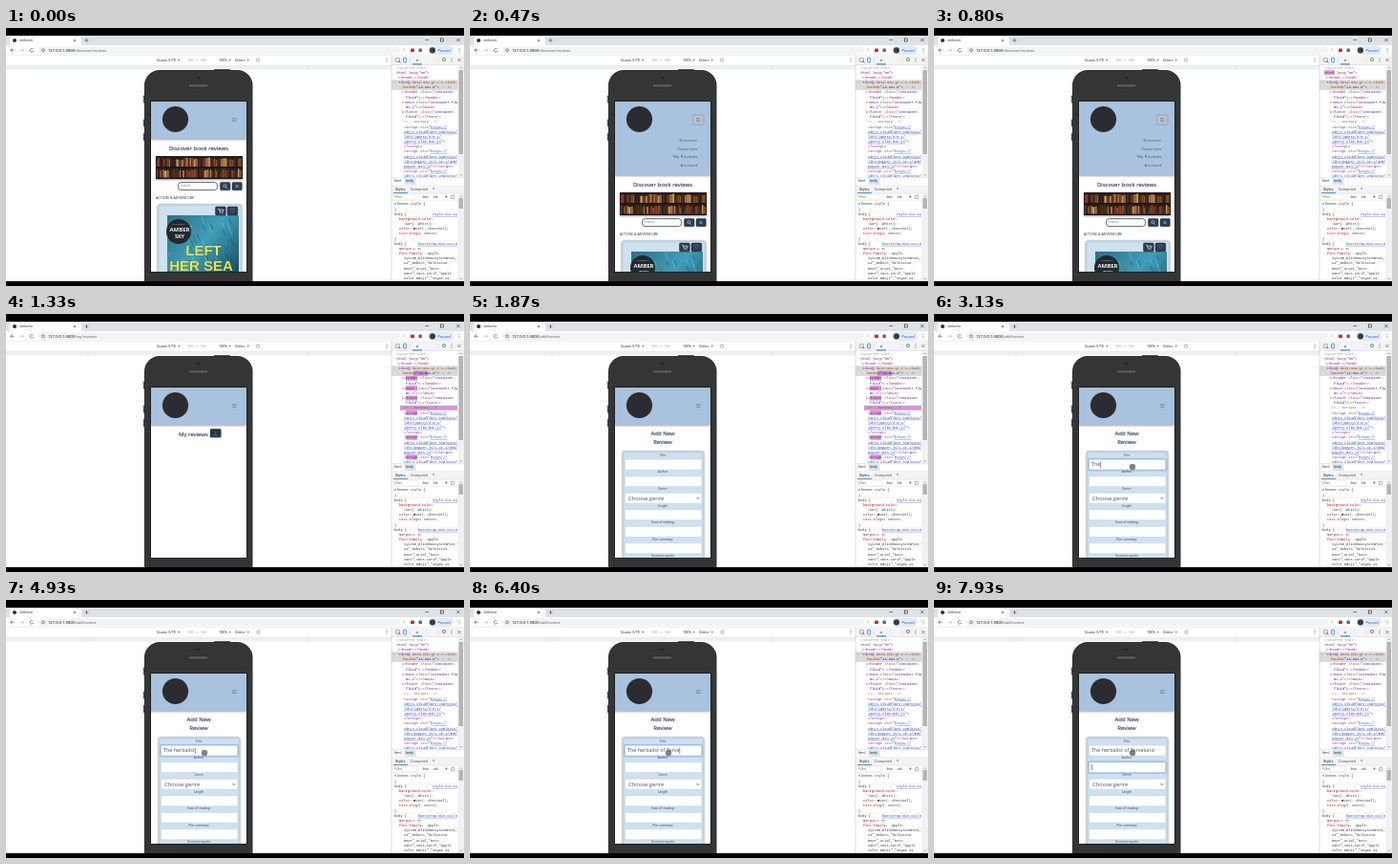
An HTML page with a canvas that plays this animation: 480 px wide and 270 px high, repeating every 8000 ms.

```html
<!DOCTYPE html>
<html lang="en">
<head>
<meta charset="utf-8">
<title>Book review app demo</title>
<style>
html, body { margin: 0; width: 100%; height: 100%; overflow: hidden; background: #000; }
canvas { display: block; width: 480px; height: 270px; }
</style>
</head>
<body>
<canvas id="stage"></canvas>
<script>
const LOOP = 8000;
const SANS = '"Open Sans", "Noto Sans", sans-serif';
const UI = 'Roboto, Arial, sans-serif';
const MONO = '"Liberation Mono", "DejaVu Sans Mono", monospace';
const NAVY = '#222b48', PALE = '#cfe1ee', HEAD = '#a9c2de', GREY = '#5f6368';

const canvas = document.getElementById('stage');
const ctx = canvas.getContext('2d');
const dpr = window.devicePixelRatio || 1;
canvas.width = 480 * dpr;
canvas.height = 270 * dpr;

function rect(x, y, w, h, fill) {
  ctx.fillStyle = fill;
  ctx.fillRect(x, y, w, h);
}
function round(x, y, w, h, r, fill, stroke, lw = 0.6) {
  ctx.beginPath();
  ctx.roundRect(x, y, w, h, r);
  if (fill) { ctx.fillStyle = fill; ctx.fill(); }
  if (stroke) { ctx.strokeStyle = stroke; ctx.lineWidth = lw; ctx.stroke(); }
}
function disc(x, y, r, fill) {
  ctx.beginPath();
  ctx.arc(x, y, r, 0, 7);
  ctx.fillStyle = fill;
  ctx.fill();
}
function line(color, lw, ...p) {
  ctx.beginPath();
  for (let i = 0; i < p.length; i += 2) ctx.lineTo(p[i], p[i + 1]);
  ctx.strokeStyle = color;
  ctx.lineWidth = lw;
  ctx.stroke();
}
function text(s, x, y, size, color, font = UI, align = 'left', weight = 400) {
  ctx.font = `${weight} ${size}px ${font}`;
  ctx.textAlign = align;
  ctx.textBaseline = 'middle';
  ctx.fillStyle = color;
  ctx.fillText(s, x, y);
}
function shadow(color, blur, dy) {
  ctx.shadowColor = color;
  ctx.shadowBlur = blur * dpr;
  ctx.shadowOffsetY = dy * dpr;
}
function noShadow() { shadow('transparent', 0, 0); }
function clipped(x, y, w, h, draw) {
  ctx.save();
  ctx.beginPath();
  ctx.rect(x, y, w, h);
  ctx.clip();
  draw();
  ctx.restore();
}
function randomizer(seed) {
  return () => (seed = (seed * 16807) % 2147483647) / 2147483647;
}
const clamp = v => Math.max(0, Math.min(1, v));
const ease = v => { v = clamp(v); return v * v * (3 - 2 * v); };

// ---- timeline ----
const OPEN = 70, REVIEWS = 930, ADD = 1800, FOCUS = 2470, TAB = 7670;
const TITLE = 'The herbalist of Torvelund';
const KEYS = [2670, 2870, 3070, 3270, 3400, 3470, 3530, 3600, 3730, 3930, 4670, 4800, 4870,
  5000, 5070, 5130, 5200, 5400, 5600, 5800, 6000, 6400, 6600, 6870, 7070, 7270];

// ---- browser window ----
function caret(x, y) {
  ctx.beginPath();
  ctx.moveTo(x, y); ctx.lineTo(x + 2.4, y); ctx.lineTo(x + 1.2, y + 1.6);
  ctx.fillStyle = GREY;
  ctx.fill();
}
function cross(x, y, r, color = '#444') {
  line(color, 0.6, x - r, y - r, x + r, y + r);
  line(color, 0.6, x + r, y - r, x - r, y + r);
}
function dots(x, y) {
  for (let i = -1; i < 2; i++) disc(x, y + i * 1.7, 0.5, GREY);
}
function drawBrowser(path) {
  rect(0, 0, 480, 270, '#000');
  rect(0, 8, 480, 257, '#fff');
  rect(0, 8, 480, 10, '#dee1e6');
  round(4, 9, 75, 10, [3, 3, 0, 0], '#fff');
  disc(9, 13, 2, '#2c2d33');
  text('Jotloven', 14, 13, 3.7, '#333');
  cross(72, 13, 1.1);
  line('#444', 0.6, 82.5, 13, 86.5, 13);
  line('#444', 0.6, 84.5, 11, 84.5, 15);
  line('#222', 0.6, 439.5, 12.5, 443, 12.5);
  ctx.strokeRect(455.5, 11, 3, 3);
  cross(474, 12.5, 1.6, '#222');

  line('#555', 0.7, 8.5, 23.3, 4.8, 23.3);
  line('#555', 0.7, 6.5, 21.5, 4.7, 23.3, 6.5, 25.1);
  line('#bbb', 0.7, 14.5, 23.3, 18.5, 23.3);
  line('#bbb', 0.7, 16.8, 21.5, 18.6, 23.3, 16.8, 25.1);
  ctx.beginPath();
  ctx.arc(27, 23.3, 1.8, 0.4, 5.6);
  ctx.strokeStyle = '#555';
  ctx.stroke();
  round(34, 19.5, 379, 7.6, 3.8, '#f1f3f4');
  ctx.beginPath();
  ctx.arc(39, 23.3, 1.5, 0, 7);
  ctx.stroke();
  const host = '127.0.0.1:5000';
  text(host, 44, 23.4, 4.2, '#202124');
  text(path, 44 + ctx.measureText(host).width, 23.4, 4.2, '#666a6e');
  text('☆', 417, 23.3, 4.5, GREY, '"DejaVu Sans", sans-serif', 'center');
  round(424, 21.4, 4, 3.6, 0.6, '#b33a45');
  round(432.5, 21.4, 3.4, 3.6, 0.6, '#666');
  round(442.5, 19.3, 26, 8, 4, '#e3edfb', '#b8cdf0', 0.4);
  disc(447, 23.3, 3.1, '#3d3a3b');
  text('Paused', 452.5, 23.4, 4, '#2565c7');
  dots(475, 23.3);

  // device toolbar and ruler
  rect(0, 28, 404, 11, '#fff');
  line('#d5d7da', 0.5, 0, 28.2, 480, 28.2);
  text('Quorin 5/TE', 158, 33.7, 3.8, '#333');
  caret(180, 33);
  text('320   ×   568', 190, 33.7, 3.7, '#aaa');
  text('100%', 223, 33.7, 3.7, '#333');
  caret(233.5, 33);
  text('Online', 240, 33.7, 3.7, '#333');
  caret(252.5, 33);
  round(262.7, 32, 3, 3, 0.4, null, '#777', 0.5);
  dots(399, 33.5);
  rect(0, 39, 404, 4.5, '#eeeff0');
  line('#dcdddf', 0.4, 0, 39, 404, 39);
  line('#c5c7c9', 0.5, 86, 40, 86, 43);
  line('#c5c7c9', 0.5, 317, 40, 317, 43);
}

// ---- developer tools ----
const INK = { p: '#881280', a: '#994500', v: '#1a1aa6', k: '#333', g: '#999', c: '#3b7a3f', r: '#c80000', u: '#2a3cc0' };
const STEP = 5.17;

// "^x" switches to ink x
function code(s, x, y) {
  for (const part of s.split('^').slice(1)) {
    const word = part.slice(1);
    text(word, x, y, 3.6, INK[part[0]], MONO);
    const w = ctx.measureText(word).width;
    if (part[0] === 'u') line(INK.u, 0.35, x, y + 1.9, x + w, y + 1.9);
    x += w;
  }
}
const SRC = '^p<script ^asrc^k="^uhttps://';
const CDN = '^ucdnjs.cloudflare.com/ajax/';
const TREE = [
  [409, '^g<\!DOCTYPE html>'],
  [409, '^p<html ^alang^p="^ven^p">'],
  [411, '^k▸^p<head>^k…^p<\/head>'],
  [411, '^k▾^p<body ^adata-new-gr-c-s-check-'],
  [415, '^aloaded^p="^v14.981.0^p">^g == $0'],
  [415, '^k▸^p<header ^aclass^p="^vcontainer-'],
  [419, '^vfluid^p">^k…^p<\/header>'],
  [415, '^k▸^p<main ^aclass^p="^vcontainer-fluid'],
  [419, '^vmt-2^p">^k…^p<\/main>'],
  [415, '^k▸^p<footer ^aclass^p="^vcontainer-'],
  [419, '^vfluid^p">^k…^p<\/footer>'],
  [417, '^c<\!-- Scripts --\>'],
  [417, SRC], [417, CDN], [417, '^ulibs/jquery/3.5.1/'], [417, '^ujquery.slim.min.js^p">'], [417, '^p<\/script>'],
  [417, SRC], [417, CDN], [417, '^ulibs/popper.js/1.16.1/umd/'], [417, '^upopper.min.js^p"><\/script>'],
  [417, SRC], [417, CDN]
];
const RULES = [
  [407, '^kelement.style {'], [407, '^k}'], [407, '^kbody {'],
  [412, '^rbackground-color^k:'], [417, '^k□var(--white);'],
  [412, '^rcolor^k: ■var(--charcoal);'], [412, '^rtext-align^k: center;'], [407, '^k}'],
  [407, '^kbody {'], [412, '^rmargin^k:▸ 0;'], [412, '^rfont-family^k: -apple-'],
  [417, '^ksystem,BlinkMacSystemFont,"S'], [417, '^kUI",Roboto,"Helvetica'],
  [417, '^kNeue",Arial,"Noto'], [417, '^kSans",sans-serif,"Apple'], [417, '^kColor Emoji","Segoe UI']
];
function flash(row, x, w, alpha) {
  rect(x, 38.9 + row * STEP, w, 5, `rgba(190,95,185,${alpha})`);
}
function scrollbar(y, h, top, size) {
  rect(473.5, y, 6.5, h, '#f1f1f1');
  rect(474.5, top, 4.5, size, '#b5b5b5');
  line('#777', 0.6, 475.6, y + 3.4, 476.8, y + 2.2, 478, y + 3.4);
  line('#777', 0.6, 475.6, y + h - 3.4, 476.8, y + h - 2.2, 478, y + h - 3.4);
}
function drawTools(t) {
  rect(404, 28.4, 76, 237, '#fff');
  rect(404, 28.4, 76, 10, '#f3f3f3');
  line('#c8cacc', 0.5, 404, 38.4, 480, 38.4);
  round(408.5, 31.5, 4, 4, 0.6, null, '#666', 0.5);
  line('#444', 0.7, 413.6, 36.4, 411, 33.8);
  round(416.5, 31.2, 3, 4.8, 0.5, null, '#1a73e8', 0.7);
  line('#ccc', 0.5, 423.5, 31, 423.5, 36.5);
  text('»', 431, 33.2, 6, '#444', UI, 'center');
  rect(426, 37.4, 10, 1, '#1a73e8');
  line('#ccc', 0.5, 453, 31, 453, 36.5);
  text('⚙', 459, 33.5, 5.5, '#555', '"DejaVu Sans", sans-serif', 'center');
  dots(467, 33.5);
  cross(475, 33.5, 1.4);

  clipped(404, 38.6, 70, 118, () => {
    rect(404, 54.2, 70, 10.7, '#dadada');
    text('…', 405, 56.3, 4, '#555');
    if (t > 600 && t < REVIEWS) flash(1, 409, 11, 0.55);
    if (t >= REVIEWS && t < 2600) {
      const a = 0.65 * (1 - clamp((t - 2000) / 530));
      flash(4, 427, 15, a);
      for (const row of [5, 7, 9, 12, 17, 21]) flash(row, 419, 12, a);
      flash(11, 413, 60, a);
    }
    TREE.forEach(([x, s], i) => code(s, x, 41.6 + i * STEP));
  });
  scrollbar(38.6, 118, 44, 88);

  rect(404, 156.6, 76, 7.4, '#fff');
  line('#d0d0d0', 0.5, 404, 156.7, 480, 156.7);
  rect(417.5, 157.1, 12, 6.8, '#dbe4f0');
  text('html', 407, 160.4, 3.7, '#333');
  text('body', 419, 160.4, 3.7, '#333');
  rect(404, 164, 76, 9, '#f3f3f3');
  text('Styles', 408, 168.5, 3.9, '#222');
  text('Computed', 424, 168.5, 3.9, '#555');
  text('»', 447, 168, 5, '#555');
  rect(406, 172.2, 15, 0.9, '#1a73e8');
  line('#d0d0d0', 0.4, 404, 173.2, 480, 173.2);
  round(405, 174.3, 28, 5.4, 0.5, '#fff', '#ddd', 0.4);
  text('Filter', 407, 177, 3.7, '#777');
  text(':hov', 436, 177, 3.7, '#333');
  text('.cls', 447, 177, 3.7, '#333');
  text('+', 460, 176.7, 5, '#333');
  round(466.5, 175.3, 3.4, 3.4, 0.5, null, '#666', 0.5);
  line('#d8d8d8', 0.4, 404, 180.7, 480, 180.7);
  clipped(404, 181, 70, 84, () => {
    RULES.forEach(([x, s], i) => code(s, x, 184.4 + i * STEP));
    for (const row of [2, 8]) line('#ddd', 0.4, 404, 181.8 + row * STEP, 474, 181.8 + row * STEP);
    code('^ustyle.css:24', 447, 195.4);
    code('^ubootstrap.min.css:8', 432, 226.2);
  });
  scrollbar(173.5, 91.5, 178, 11);
  line('#c6c8ca', 0.6, 404, 28.4, 404, 265);
}

// ---- phone ----
function drawPhone() {
  round(143.8, 70.5, 2, 8, 0.7, '#555');
  round(143.8, 95.5, 2, 8, 0.7, '#555');
  round(143.8, 110, 2, 8, 0.7, '#555');
  round(218, 42.9, 17, 2, 0.7, '#555');
  round(145, 44, 113.5, 250, 16, '#252627');
  round(146.4, 45.4, 110.7, 248, 14.6, '#343536', '#47494a', 0.6);
  disc(201.5, 52, 1.3, '#1d1e20');
  round(191, 58.6, 21, 3.4, 1.7, '#59595b', '#222', 0.6);
  rect(151.3, 76.3, 101.4, 179.4, '#1c1c1d');
  rect(152, 77, 100, 178, '#fff');
}
function heading(s, y) {
  shadow('rgba(70,80,130,.55)', 1.2, 0.5);
  text(s, 202, y, 6, NAVY, SANS, 'center');
  noShadow();
}
function drawHeader(drop) {
  shadow('rgba(90,80,110,.55)', 2, 0.8);
  rect(152, 77, 100, 39 + drop, HEAD);
  noShadow();
  disc(177.5, 95.5, 13.6, '#2b2c31');
  if (drop > 0) {
    round(233.5, 91, 11.5, 10, 1.4, '#b9c3cf', '#8a95a5', 0.7);
    clipped(152, 77, 100, 39 + drop, () => {
      ctx.letterSpacing = '0.45px';
      ['Discover', 'Favorites', 'My Reviews', 'Account'].forEach((s, i) =>
        text(s, 238.6, 118 + i * 8.7, 3.9, '#38465f', SANS, 'right'));
      ctx.letterSpacing = '0px';
    });
  }
  for (let i = -1; i < 2; i++) line('#6d7f98', 0.6, 237, 96 + i * 1.5, 241.5, 96 + i * 1.5);
}
function drawShelves(x, y) {
  const rnd = randomizer(41);
  const tones = ['#7b4a27', '#a8713d', '#4a2c1c', '#c79a62', '#5d3a2a', '#32241f', '#8c3b28'];
  shadow('rgba(60,50,90,.5)', 2, 0.8);
  rect(x, y, 91, 24, '#2a1b16');
  noShadow();
  for (let row = 0; row < 2; row++) {
    for (let bx = 1; bx < 89;) {
      const w = 1 + rnd() * 1.7, h = 7 + rnd() * 2.5;
      rect(x + bx, y + 11 + row * 11.7 - h, w - 0.3, h, tones[Math.floor(rnd() * tones.length)]);
      bx += w;
    }
    rect(x, y + 11 + row * 11.7, 91, 1.2, '#1d1312');
  }
  rect(x + 44, y, 1.4, 24, '#20140f');
}
function drawCover(y) {
  const g = ctx.createLinearGradient(169, y, 244, y + 60);
  g.addColorStop(0, '#2f6f86');
  g.addColorStop(0.5, '#3f9fb8');
  g.addColorStop(1, '#174d68');
  rect(169, y, 75, 75, g);
  const rnd = randomizer(7);
  for (let i = 0; i < 46; i++) {
    const x = 170 + rnd() * 70, by = y + rnd() * 62, l = 3 + rnd() * 7;
    line(i % 2 ? 'rgba(170,225,232,.4)' : 'rgba(10,50,75,.45)', 0.8, x, by, x + l * 0.4, by + l);
  }
  disc(181, y + 17, 13, '#22292f');
  text('AUTHOR OF', 181, y + 9, 2.4, '#cdd6d8', SANS, 'center');
  text('AMBER', 182, y + 15.5, 6, '#eef0ee', SANS, 'center', 700);
  text('SKY', 182, y + 22.5, 5.5, '#eef0ee', SANS, 'center', 700);
  const face = '"Liberation Sans", Arial, sans-serif';
  shadow('rgba(10,40,50,.8)', 1, 0.5);
  text('LEFT', 207, y + 37.5, 15, '#f1e445', face, 'center', 700);
  text('HER SEA', 204.5, y + 53.5, 15, '#f1e445', face, 'center', 700);
  noShadow();
}
function darkButton(x, y, w, h) { round(x, y, w, h, 1.3, '#2d3d52', '#1f2b3b', 0.5); }

function drawDiscover(drop) {
  ctx.save();
  ctx.translate(0, drop);
  heading('Discover book reviews', 126);
  drawShelves(157, 134);
  round(180.5, 161.6, 41, 8, 3, '#fff', '#35435a', 0.8);
  text('search...', 183, 165.6, 3.3, '#777', SANS);
  darkButton(224.5, 161.4, 10.5, 8.4);
  ctx.beginPath();
  ctx.arc(229.4, 165.2, 1.5, 0, 7);
  ctx.strokeStyle = '#dfe9f2';
  ctx.lineWidth = 0.6;
  ctx.stroke();
  line('#dfe9f2', 0.7, 230.5, 166.3, 231.8, 167.6);
  darkButton(237, 161.4, 10.3, 8.4);
  cross(242.1, 165.6, 1.5, '#dfe9f2');
  text('ACTION & ADVENTURE', 157, 178.2, 3.8, NAVY, SANS);
  shadow('rgba(80,100,130,.5)', 2, 0.5);
  round(159, 184.5, 88, 90, 3, PALE, '#b4c8d8', 0.6);
  noShadow();
  drawCover(196);
  darkButton(219.5, 187, 10.8, 9);
  line('#e6eef5', 0.7, 222, 189.4, 223.2, 189.4, 224.2, 192.4, 227.3, 192.4, 228, 190.2, 223.6, 190.2);
  disc(224.6, 193.9, 0.5, '#e6eef5');
  disc(227, 193.9, 0.5, '#e6eef5');
  darkButton(232, 187, 10.8, 9);
  text('♡', 237.4, 191.5, 6, '#e6eef5', '"DejaVu Sans", sans-serif', 'center');
  ctx.restore();
}
function drawReviews() {
  shadow('rgba(70,80,130,.55)', 1.2, 0.5);
  text('My reviews', 181, 126, 6, NAVY, SANS);
  shadow('rgba(60,70,120,.7)', 2, 0.4);
  round(214, 120.3, 11.3, 8.8, 1, '#2a3448');
  noShadow();
  line('#5d6d8a', 0.6, 216, 126.5, 219.6, 127, 223.3, 126.5);
  line('#5d6d8a', 0.6, 219.6, 122.5, 219.6, 127);
}
function drawAdd(t) {
  heading('Add New', 125);
  heading('Review', 134);
  shadow('rgba(70,90,130,.6)', 2, 0.5);
  round(160, 143.5, 85, 130, 2, PALE, '#b9cbdb', 0.5);
  noShadow();
  const labels = ['Title', 'Author', 'Genre', 'Length', 'Ease of reading', 'Plot summary', 'Favourite quote'];
  const active = t < FOCUS ? -1 : t < TAB ? 0 : 1;
  labels.forEach((s, i) => {
    const y = 148 + i * 17.55;
    text(s, 202, y, 3.3, '#39445c', SANS, 'center');
    const on = i === active;
    if (on) round(161.6, y + 3.3, 82, 12.6, 1.5, null, 'rgba(110,170,235,.5)', 1.2);
    round(162.3, y + 4.1, 80.6, 11, 1, '#fff', on ? '#7fb0e6' : '#c3d0dc', 0.6);
  });
  text('Choose genre', 166, 193, 5.8, '#49505a', SANS);
  line('#444', 0.7, 237.6, 192, 239, 193.6, 240.4, 192);

  const typed = KEYS.filter(k => k <= t).length;
  const shown = TITLE.slice(0, typed);
  text(shown, 165, 157.8, 5.4, '#495057', SANS);
  const last = typed ? KEYS[typed - 1] : FOCUS;
  if (active === 0 && (t - last) % 1000 < 500) {
    rect(165.2 + ctx.measureText(shown).width, 154.6, 0.5, 6.6, '#333');
  }
  if (t >= 7930) rect(165, 171.8, 0.5, 6.6, '#333');
  if (t >= 2070) {
    const k = ease((t - 2070) / 330);
    disc(219 - 11 * k, 125 + 35 * k, 3.2, 'rgba(75,75,80,.7)');
  }
}

function draw(t) {
  ctx.setTransform(dpr, 0, 0, dpr, 0, 0);
  const page = t < REVIEWS ? 'discover/reviews' : t < ADD ? 'my/reviews' : 'add/review';
  const drop = t < REVIEWS ? 38 * ease((t - OPEN) / 380) : 0;
  drawBrowser('/' + page);
  clipped(0, 8, 404, 257, () => {
    drawPhone();
    clipped(152, 77, 100, 178, () => {
      if (t < REVIEWS) drawDiscover(drop);
      else if (t < ADD) drawReviews();
      else drawAdd(t);
      drawHeader(drop);
    });
  });
  drawTools(t);
  rect(0, 265, 480, 5, '#000');
}

const start = performance.now();
function tick() {
  draw((performance.now() - start) % LOOP);
  requestAnimationFrame(tick);
}
tick();
</script>
</body>
</html>
```
